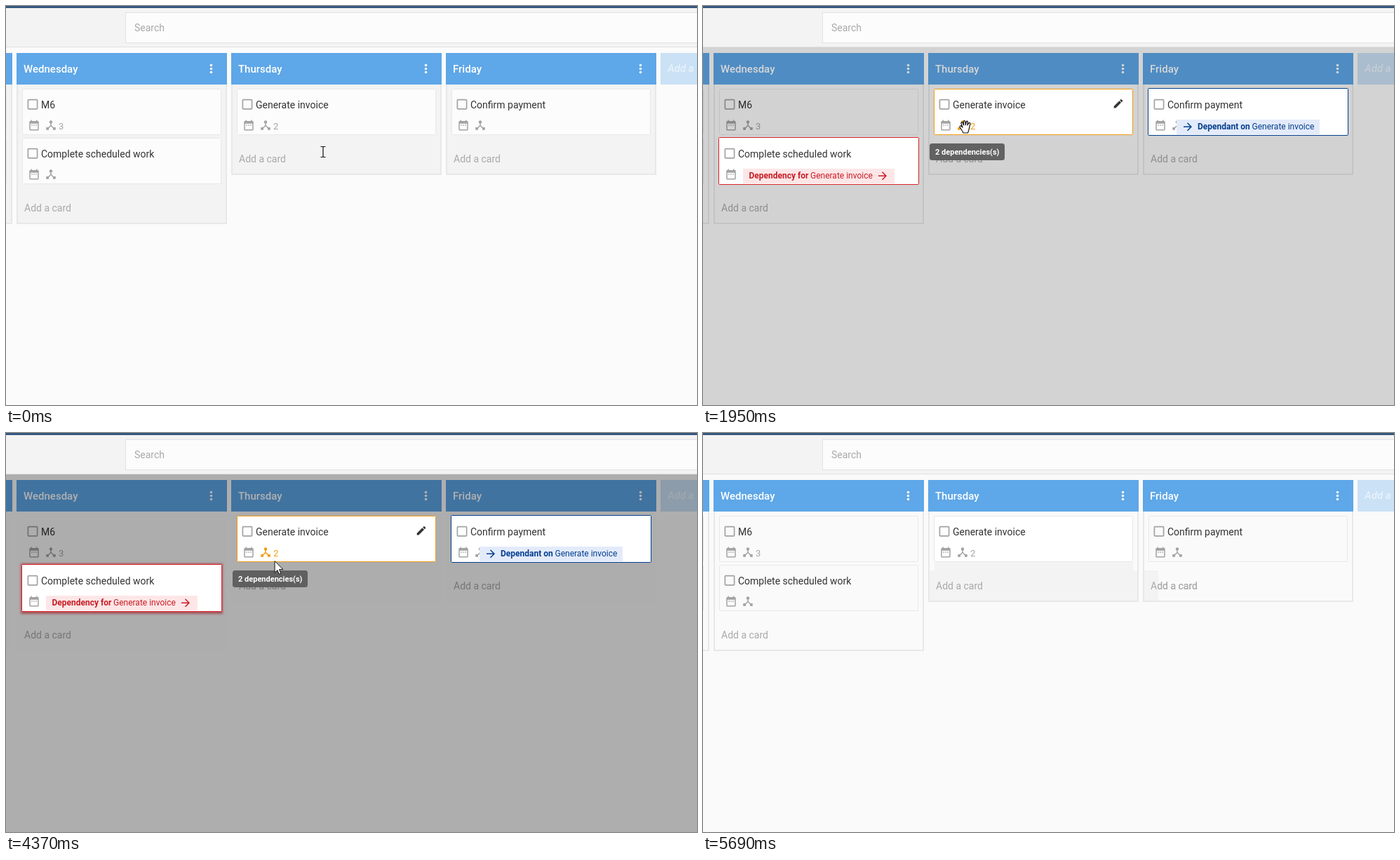
These frames come from a looping animation (985 px wide and 569 px high, 6.19 s). An HTML page:

```html
<!DOCTYPE html>
<html lang="en">
<head>
<meta charset="utf-8">
<title>Task board</title>
<style>
  html, body { margin: 0; width: 100%; height: 100%; overflow: hidden; background: #fbfbfb; }
  svg { display: block; width: 100%; height: 100%; font: 14px Roboto, sans-serif; }
</style>
</head>
<body>
<svg id="stage" viewBox="0 0 985 569"></svg>
<script>
const LOOP = 6190;
const DIM_START = 1510, DIM_FULL = 2360, DIM_END = 4430;
const HOVER_ON = 340, HOVER_OFF = 4570, TIP_OFF = 4740, EXIT = 5690;
const GREY = '#a3a3a3', ORANGE = '#f39c12', RED = '#c81d25', BLUE = '#053f8f';

const ICON = {
  calendar: 'M9 11H7v2h2zM13 11h-2v2h2zM17 11h-2v2h2zM19 4h-1V2h-2v2H8V2H6v2H5C3.9 4 3 4.9 3 6v14c0 1.1.9 2 2 2h14c1.1 0 2-.9 2-2V6c0-1.1-.9-2-2-2zM19 20H5V9h14z',
  hub: 'M17 16l-4-4V8.8C14.2 8.4 15 7.3 15 6a3 3 0 1 0-6 0c0 1.3.8 2.4 2 2.8V12l-4 4H3v5h5v-3l4-4.2 4 4.2v3h5v-5z',
  pencil: 'M3 17.25V21h3.75L17.8 9.94 14.06 6.2zM20.7 7c.4-.4.4-1 0-1.4l-2.3-2.3c-.4-.4-1-.4-1.4 0l-1.9 1.8 3.8 3.8z',
  arrow: 'M12 4l-1.4 1.4L16.2 11H4v2h12.2l-5.6 5.6L12 20l8-8z'
};

const rect = (x, y, w, h, fill, extra = '') =>
  `<rect x="${x}" y="${y}" width="${w}" height="${h}" fill="${fill}" ${extra}/>`;
const text = (x, y, str, fill, extra = '') =>
  `<text x="${x}" y="${y}" fill="${fill}" ${extra}>${str}</text>`;
const icon = (name, x, y, scale, fill, extra = '') =>
  `<path d="${ICON[name]}" transform="translate(${x} ${y}) scale(${scale}) translate(-12 -12)" fill="${fill}" fill-rule="evenodd" ${extra}/>`;
const group = (id, body) => `<g id="${id}">${body}</g>`;

const cardFrame = (x, y, stroke, grow = 0, extra = '') =>
  rect(x + .5 - grow, y + .5 - grow, 283 + 2 * grow, 65 + 2 * grow, '#fff', `rx="1" stroke="${stroke}" ${extra}`);

const cardBody = (x, y, title, count = '', ids = '') =>
  rect(x + 8.4, y + 15.6, 13.2, 13.2, 'none', `rx="1" stroke="${GREY}" stroke-width="1.7"`) +
  text(x + 27, y + 28, title, '#333') +
  icon('calendar', x + 17, y + 52, .75, GREY) +
  `<g ${ids} fill="${GREY}">` + icon('hub', x + 41, y + 52, .75, 'inherit').replace('fill="inherit"', '') +
  `<text x="${x + 52}" y="${y + 57.5}" font-size="13">${count}</text></g>`;

const card = (x, y, title, count) =>
  cardFrame(x, y, '#e8e8e8', 0, 'class="card"') + cardBody(x, y, title, count);

const column = (x, bottom, title) =>
  rect(x, 112, 300, bottom - 112, '#f3f3f3', 'class="col"') +
  `<path class="edge" d="M${x + 1} 112V${bottom - 1}H${x + 299}V112" fill="none" stroke="#e8e8e8" stroke-width="2"/>` +
  rect(x, 67, 300, 45, '#5ea7e8') +
  text(x + 10, 95, title, '#fff', 'font-size="15" font-weight="500"') +
  [84.5, 89.5, 94.5].map(y => `<circle cx="${x + 277.5}" cy="${y}" r="1.8" fill="#fff"/>`).join('') +
  text(x + 11, bottom - 18, 'Add a card', '#a9a9a9');

const tag = (x, y, w, bg, color, boldX, label, nameX, arrowX) =>
  rect(x, y, w, 21, bg) +
  text(boldX, y + 14, label, color, 'font-size="12" font-weight="700"') +
  text(nameX, y + 14, 'Generate invoice', color, 'font-size="12"') +
  icon('arrow', arrowX, y + 10.3, .75, color);

const stage = document.getElementById('stage');
stage.innerHTML =
  '<defs><filter id="blur"><feGaussianBlur stdDeviation="1.6"/></filter></defs>' +
  rect(0, 0, 985, 569, '#fbfbfb', 'id="page"') +
  column(-291, 311, '') + column(15, 311, 'Wednesday') +
  column(321, 241, 'Thursday') + column(627, 241, 'Friday') +
  group('patchTop', rect(330, 184, 283, 12, '#f3f3f3')) +
  group('patchLow', rect(323, 196, 296, 43, '#f3f3f3') + rect(629, 196, 20, 43, '#f3f3f3') +
    text(332, 223, 'Add a card', '#a9a9a9') + text(638, 223, 'Add a card', '#a9a9a9')) +
  rect(933, 67, 52, 45, '#cae1f6') +
  text(943, 94, 'Add a', '#e8f2fb', 'font-size="15" font-weight="500" font-style="italic"') +
  card(-283, 118, '') + card(-283, 188, '') +
  card(23, 118, 'M6', 3) + card(23, 188, 'Complete scheduled work') +
  card(635, 118, 'Confirm payment') +
  group('idle', card(329, 118, 'Generate invoice', 2)) +
  rect(0, 59, 985, 510, '#000', 'id="dim"') +
  rect(0, 0, 985, 58, '#f3f3f3') + rect(0, 58, 985, 1, '#e0e0e0') + rect(0, 0, 985, 3, '#34587f') +
  rect(170.5, 9.5, 830, 43, '#fcfcfc', 'stroke="#e2e2e2"') + text(183, 36, 'Search', '#a9a9a9') +
  group('hover', cardFrame(329, 118, ORANGE) +
    '<circle id="halo" cx="592" cy="139" r="19.5" fill="#f3f3f3"/>' +
    rect(360, 158, 34, 25, '#f4f4f4', 'rx="9" id="ripple"') +
    cardBody(329, 118, 'Generate invoice', 2, 'id="hub"') + icon('pencil', 592, 139.3, .7, '#333')) +
  group('links',
    rect(21, 186, 288, 72, '#a01c28', 'id="glow" opacity=".6" filter="url(#blur)"') +
    cardFrame(23, 188, '#dc2228', 1) + cardBody(23, 188, 'Complete scheduled work') +
    tag(57, 232, 216, '#fde6e7', RED, 65.5, 'Dependency for', 153, 256) +
    cardFrame(635, 118, BLUE, 1) + cardBody(635, 118, 'Confirm payment') +
    tag(675, 162, 204, '#e3ebfb', BLUE, 705, 'Dependant on', 782.5, 691)) +
  group('tip', rect(323, 196, 107, 24, '#5a5a5a', 'rx="3.5" opacity=".92"') +
    text(331, 211.5, '2 dependencies(s)', '#fff', 'font-size="11" font-weight="700"')) +
  group('pointer',
    '<path id="arrow" d="M0 0V16.6L3.8 13 6.3 18.7 8.8 17.6 6.4 12H11.8Z" fill="#fff" stroke="#111"/>' +
    '<path id="hand" d="M-3 9C-4 6-7 2.500-8 .5C-8.600-1-6.600-1.800-5.500-.5L-4 1.200L-6-4.500C-6.300-6.500-4.300-6.800-3.700-5.200L-2.400-2L-2.600-7C-2.500-8.800-.4-8.800-.2-7L.3-2.400L1.300-7C1.800-8.500 3.600-8.200 3.400-6.400L3-2L4.800-5C5.800-6.200 7.400-5.300 6.800-3.700L5.300 3C5 5 4 7 3.600 9Z" fill="#fff" stroke="#111" stroke-width="1.200" stroke-linejoin="round"/>' +
    '<path id="beam" d="M-3.500-7.500H-1L0-6.800 1-7.500H3.500M0-6.800V6.800M-3.500 7.500H-1L0 6.800 1 7.500H3.500" fill="none" stroke="#111" stroke-width="1.200"/>');

const el = {};
for (const node of stage.querySelectorAll('[id]')) el[node.id] = node;
const cards = stage.querySelectorAll('.card');
const cols = stage.querySelectorAll('.col');
const edges = stage.querySelectorAll('.edge, .card');

// Pointer stops: time, x, y
const TRACK = [
  [0, 452, 208], [50, 452, 208], [340, 448, 181], [660, 438, 172],
  [1050, 352, 171], [1160, 352, 171], [1400, 379, 172], [1560, 374, 172],
  [3920, 374, 172], [4370, 383, 182.5], [4430, 388, 186.5], [4520, 400, 194],
  [4740, 637, 300], [4960, 738, 372], [5180, 733, 414], [5230, 733, 414],
  [5690, 896, 572], [LOOP, 896, 572]
];

const clamp = v => Math.max(0, Math.min(1, v));
const show = (node, on) => node.setAttribute('visibility', on ? 'visible' : 'hidden');
const paint = (nodes, name, value) => nodes.forEach(n => n.setAttribute(name, value));

function pointerAt(t) {
  const i = TRACK.findIndex(stop => stop[0] > t);
  const [t0, x0, y0] = TRACK[i - 1], [t1, x1, y1] = TRACK[i];
  const k = (t - t0) / (t1 - t0);
  return [x0 + (x1 - x0) * k, y0 + (y1 - y0) * k];
}

function render(t) {
  const dimmed = t >= DIM_START && t < DIM_END;
  const settled = t >= DIM_END;
  const hover = t >= HOVER_ON && t < HOVER_OFF;
  const [x, y] = pointerAt(t);

  el.page.setAttribute('fill', settled ? '#fafafa' : '#fbfbfb');
  paint(cols, 'fill', t >= DIM_START ? '#fafafa' : '#f3f3f3');
  paint(cards, 'fill', t >= DIM_START ? '#fafafa' : '#fcfcfc');
  cards[cards.length - 1].setAttribute('fill', t >= HOVER_OFF ? '#fff' : '#fcfcfc');
  paint(edges, 'stroke-opacity', dimmed ? 1 - clamp((t - 1950) / (DIM_FULL - 1950)) : 1);
  el.dim.setAttribute('opacity', dimmed ? .31 * clamp((t - DIM_START) / (DIM_FULL - DIM_START)) : 0);

  show(el.patchTop, t >= HOVER_OFF);
  show(el.patchLow, t >= TIP_OFF);
  show(el.idle, !hover);
  show(el.hover, hover);
  show(el.halo, hover && t < DIM_START);
  show(el.links, dimmed);
  show(el.glow, dimmed && t >= 4250);
  show(el.tip, t >= DIM_START + 50 && t < TIP_OFF);

  const onHub = x >= 361 && x < 394;
  show(el.ripple, hover && t > 660 && t < DIM_START && x < 394);
  el.ripple.setAttribute('x', onHub ? 360 : 331);
  el.hub.setAttribute('fill', t > 660 && t < DIM_END && onHub ? ORANGE : GREY);

  const onCard = hover && y < 182;
  const onInput = y > 196 && y < 238 && x < 615;
  el.pointer.setAttribute('transform', `translate(${x} ${y})`);
  show(el.hand, onCard);
  show(el.beam, onInput);
  show(el.arrow, !onCard && !onInput && t < EXIT);
}

const start = performance.now();
function tick() {
  render((performance.now() - start) % LOOP);
  requestAnimationFrame(tick);
}
tick();
</script>
</body>
</html>
```
